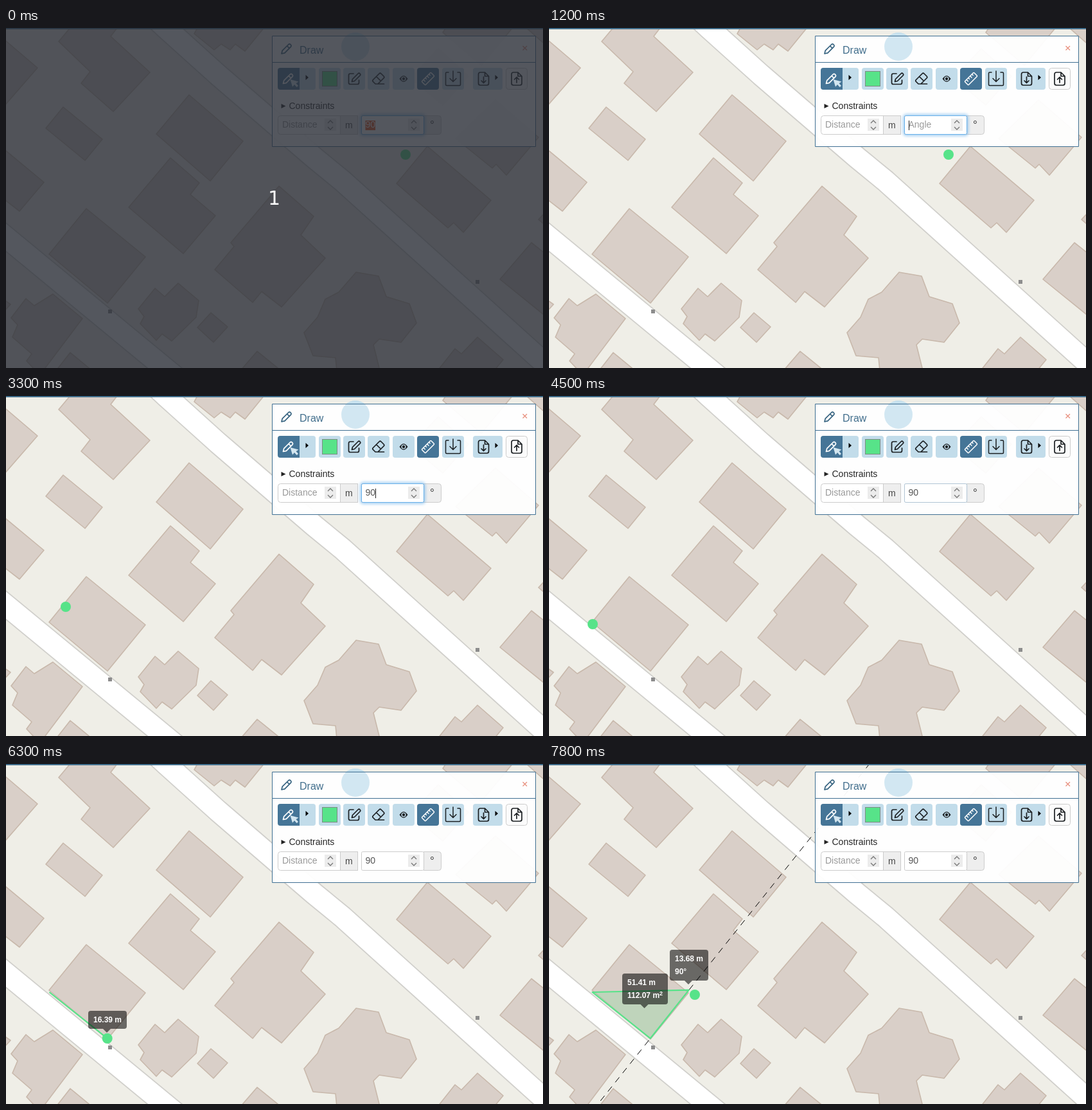
An HTML page for the animation above (8 s loop, 836 px wide and 529 px high).

```html
<!DOCTYPE html>
<html lang="en">
<head>
<meta charset="utf-8">
<title>Draw with constraints</title>
<style>
html, body { margin: 0; width: 100%; height: 100%; overflow: hidden; }
svg { display: block; width: 836px; height: 529px; font-family: "Liberation Sans", Arial, sans-serif; font-size: 14px; }
.bld path { fill: #d9cfc8; stroke: #c8b8ab; stroke-width: 1.6; stroke-linejoin: round; }
.road { fill: none; stroke-linejoin: round; }
.case { stroke: #d0cfcb; stroke-width: 36; }
.lane { stroke: #fff; stroke-width: 32.5; }
.btn { fill: #c2dcea; }
.on { fill: #457597; }
.ico { fill: none; stroke: #1b1f22; stroke-width: 1.7; stroke-linejoin: round; stroke-linecap: round; }
.field { fill: #fff; stroke: #ccc; }
.addon { fill: #eee; stroke: #ccc; }
.spin { fill: none; stroke: #777; stroke-width: 1.3; }
.hint { fill: #999; }
.tip text { font-size: 12px; font-weight: bold; fill: #fff; }
.tip .sup { font-size: 9px; }
.tip rect, .tip path { fill: #000; fill-opacity: .56; }
</style>
</head>
<body>
<svg viewBox="0 0 836 529" width="836" height="529">
  <defs>
    <filter id="glow" x="-20%" y="-50%" width="140%" height="200%"><feGaussianBlur stdDeviation="2.2"/></filter>
    <g id="pencil"><path d="M-7.5 7.5L-6.3 2.6L3.4-7Q4.8-8.2 6.2-7L7-6.2Q8.2-4.8 7-3.4L-2.6 6.3ZM1-4.6L4.6-1"/></g>
    <g id="spinner">
      <rect x="-9" y="141" width="18" height="19" fill="#ececec"/>
      <path class="spin" d="M-4 148L0 144L4 148M-4 154L0 158L4 154"/>
    </g>
    <g id="sheet"><path d="M2-10H-5Q-8-10-8-7V7Q-8 10-5 10H5Q8 10 8 7V-4ZM2-10V-4H8"/></g>
  </defs>

  <rect width="836" height="529" fill="#efeee7"/>
  <g class="road case"><path d="M234-14L249 0L330 73L480 202L524 238L850 532"/><path d="M-20 309L270 548"/></g>
  <g class="road lane"><path d="M234-14L249 0L330 73L480 202L524 238L850 532"/><path d="M-20 309L270 548"/></g>
  <g class="bld">
    <path d="M-5 16L49 62L-5 124Z"/>
    <path d="M82 21L103-4H176L163 13L224 69L167 130L117 86L131 68Z"/>
    <path d="M89 123L150 173L123 206L62 156Z"/>
    <path d="M285 104L369 176L318 238L234 165Z"/>
    <path d="M-5 187L59 240L21 285L-5 265Z"/>
    <path d="M256 202L301 241L287 259L326 292L276 351L191 279Z"/>
    <path d="M125 281L217 356L158 428L67 352Z"/>
    <path d="M425 246L479 293L459 322L497 358L429 434L398 410L384 427L325 376L355 340L350 334Z"/>
    <path d="M232 405L247 418L268 397L300 424L296 450L258 487L243 476L234 486L209 460L215 449L206 437Z"/>
    <path d="M319 443L345 465L323 489L298 466Z"/>
    <path d="M31 421L44 432L73 414L119 452L58 533H46L32 518L40 507L10 481L18 462L8 451Z"/>
    <path d="M100 505L134 533H78Z"/>
    <path d="M-4 422L7 430L-4 442Z"/>
    <path d="M391 503L428 533H365Z"/>
    <path d="M545 380L580 386L592 418L628 429L639 459L615 489L581 484L572 493L582 533H515L513 513L478 510L464 474L485 450L497 422L518 411Z"/>
    <path d="M734 481L774 516L760 533H672L699 499L709 507Z"/>
    <path d="M818 334L842 353V450L769 391Z"/>
    <path d="M656 184L755 268L712 318L697 303L688 311L608 242Z"/>
    <path d="M700 172L757 218L763 212L779 229L829 170L762 112Z"/>
    <path d="M842 284L829 298L842 309Z"/>
    <path d="M299-2L293 9L324 34L335 25L349 34L357 25L372 36L403-2Z"/>
    <path d="M686-2L680 7L740 58L790-2Z"/>
    <path d="M808-2L842 28V-2Z"/>
    <path d="M673 32L720 75L680 120L630 78Z"/>
  </g>
  <g fill="#8d8d8d"><rect x="159" y="438" width="6" height="6"/><rect x="731" y="392" width="6" height="6"/></g>

  <g id="sketch">
    <path id="guide" d="M80.2 524L497.2 2" fill="none" stroke="#000" stroke-dasharray="10 8.4"/>
    <path id="shape" fill="#57e389" fill-opacity=".2" stroke="#57e389" stroke-width="2.2" stroke-linejoin="round"/>
    <circle id="dot" r="8" fill="#57e389"/>
    <g id="tipA" class="tip"></g>
    <g id="tipB" class="tip"></g>
  </g>

  <rect width="836" height="2" fill="#426f8d"/>

  <g id="panel">
    <circle cx="544" cy="29" r="22" fill="#bcd9e7"/>
    <rect x="414.5" y="12.5" width="410" height="172" fill="#fff" fill-opacity=".95"/>
    <circle cx="544" cy="29" r="22" fill="#c9e3ef" fill-opacity=".8"/>
    <path d="M414.5 12.5H824.5V184.5H414.5ZM414.5 53.5H824.5" fill="none" stroke="#3f6f92"/>
    <g class="ico" style="stroke:#35627f"><use href="#pencil" x="436.5" y="32.5"/></g>
    <text x="457" y="40" font-size="16" fill="#416e8c">Draw</text>
    <path d="M804.5 28L811 34.5M811 28L804.5 34.5" stroke="#e8907e" stroke-width="1.3"/>

    <path class="btn" d="M457 62H478Q482 62 482 66V92Q482 96 478 96H457Z"/>
    <path class="on" d="M427 62H457V96H427Q423 96 423 92V66Q423 62 427 62Z"/>
    <g id="buttons"></g>
    <path d="M466.500 73L471 77L466.500 81ZM761.500 73L766 77L761.500 81Z" fill="#000"/>
    <g class="ico" style="stroke:#fff"><use href="#pencil" x="439" y="79"/></g>
    <path d="M442.500 80L455.500 83.500L451.500 86L455 90L452.500 92L449 88L446 91.500Z" fill="#d3e6f0"/>
    <rect x="492.500" y="67.500" width="23" height="23" fill="#57e389" stroke="#7d8b83"/>
    <g class="ico">
      <path d="M541 71H536Q533.500 71 533.500 73.500V85Q533.500 87.500 536 87.500H547Q549.500 87.500 549.500 85V81M538.500 83.500L539.500 79.500L548 71Q549.500 69.500 551 71Q552.500 72.500 551 74L542.500 82.500Z"/>
      <path d="M571.500 80.500L581 71Q582.500 69.500 584 71L588 75Q589.500 76.500 588 78L579 87H575L571.500 83.500Q570 82 571.500 80.500ZM576.500 75.500L583.500 82.500M579 87H588.500"/>
      <path d="M689 69H686Q684.500 69 684.500 70.500V88Q684.500 89.500 686 89.500H706Q707.500 89.500 707.500 88V70.500Q707.500 69 706 69H703M696 67V83M691 78.500L696 83.500L701 78.500" stroke-width="1.5"/>
      <use href="#sheet" x="743.500" y="79"/><path d="M743.500 76V85M740 82L743.500 85.500L747 82"/>
      <use href="#sheet" x="795" y="79"/><path d="M795 85V77M791.500 80L795 76.500L798.500 80"/>
    </g>
    <path d="M612.500 79Q619 69.500 625.500 79Q619 88.500 612.500 79Z" fill="#1b1f22"/>
    <circle cx="619" cy="79" r="3.600" fill="#c2dcea"/><circle cx="619" cy="79" r="2.200" fill="#1b1f22"/>
    <g transform="translate(657 79) rotate(-45)" fill="none" stroke="#fff" stroke-width="1.500">
      <rect x="-10" y="-4" width="20" height="8" rx="1"/><path d="M-6-4V0M-2-4V-1M2-4V0M6-4V-1"/>
    </g>

    <path d="M428.500 118L435.500 121.500L428.500 125Z" fill="#222"/>
    <text x="440.500" y="126" fill="#262626">Constraints</text>

    <path class="field" d="M520.500 136.500H427.500Q423.500 136.500 423.500 140.500V161.500Q423.500 165.500 427.500 165.500H520.500Z"/>
    <text class="hint" x="430" y="155">Distance</text>
    <use href="#spinner" x="505"/>
    <rect class="addon" x="520.500" y="136.500" width="27" height="29"/>
    <text x="528" y="156" fill="#444">m</text>
    <path class="addon" d="M650.500 136.500H673.500Q677.500 136.500 677.500 140.500V161.500Q677.500 165.500 673.500 165.500H650.500Z"/>
    <text x="660" y="156" font-size="17" fill="#333">°</text>
    <rect id="ring" x="553.500" y="136.500" width="97" height="29" rx="3" fill="none" stroke="#66afe9" stroke-width="5" filter="url(#glow)"/>
    <rect class="field" x="553.500" y="136.500" width="97" height="29" rx="2"/>
    <rect id="edge" x="553.500" y="136.500" width="97" height="29" rx="2" fill="none" stroke="#66afe9"/>
    <use href="#spinner" x="635"/>
    <rect id="mark" x="559.500" y="144" width="15.500" height="15" fill="#e95420"/>
    <text id="angle" x="559.500" y="155"></text>
    <rect id="caret" y="144" width="1" height="15" fill="#222"/>
  </g>

  <g id="veil">
    <rect width="836" height="529" fill="#2a2d36" fill-opacity=".8"/>
    <text x="417.500" y="275" text-anchor="middle" font-size="30" fill="#fff" style="font-family:'DejaVu Sans',sans-serif">1</text>
  </g>
</svg>
<script>
const $ = id => document.getElementById(id);
const show = (el, on) => { el.style.display = on ? '' : 'none'; };
const LOOP = 8000, STEP = 100, SCALE = 0.142;
const A = [67.5, 355], B = [157.7, 426.97];

// toolbar buttons: x, width, class
$('buttons').innerHTML = [
  [487, 34, 'btn'], [525, 34, 'btn'], [563, 34, 'btn'], [602, 34, 'btn'],
  [640, 34, 'on'], [679, 34, 'btn'], [727, 46, 'btn'], [778, 34, 'addon']
].map(([x, w, c]) => c === 'addon'
  ? `<rect x="${x + .5}" y="62.5" width="${w - 1}" height="33" rx="4" fill="#fbfbfb" stroke="#ccc"/>`
  : `<rect class="${c}" x="${x}" y="62" width="${w}" height="34" rx="4"/>`).join('');

// pointer path: time, x, y
const path = [
  [2700, 622, 197], [2800, 592, 203], [2900, 480, 232], [3000, 325, 273],
  [3100, 195, 306], [3200, 115, 324], [3300, 93, 328], [3400, 93, 328],
  [3800, 78, 345], [4200, 68, 355], [4500, 68, 355], [4700, 78, 363],
  [5000, 128, 402], [5200, 147, 416.5], [5300, 152.9, 419.7], [5400, 157, 426],
  [5500, 157, 426], [5600, 157, 428], [6200, 157, 428], [6300, 157.7, 426.97],
  [7300, 157.7, 426.97], [7400, 164, 421], [7600, 201, 384], [7800, 227, 359.03]
];

function pointer(t) {
  const i = path.findIndex(k => k[0] >= t);
  if (i < 0) return path[path.length - 1].slice(1);
  if (i === 0) return path[0].slice(1);
  const [t0, x0, y0] = path[i - 1], [t1, x1, y1] = path[i];
  const k = (t - t0) / (t1 - t0);
  return [x0 + (x1 - x0) * k, y0 + (y1 - y0) * k];
}

const dist = (p, q) => Math.hypot(q[0] - p[0], q[1] - p[1]) * SCALE;
const num = v => String(+v.toFixed(2));

function tip(el, [x, y], lines) {
  show(el, !!lines);
  if (!lines) return;
  const h = 8 + 20 * lines.length, bottom = Math.round(y - 15), top = bottom - h;
  el.innerHTML = '<rect rx="4"/><path/>' + lines.map((s, i) =>
    `<text y="${top + 18 + 20 * i}">${s.replace('²', '<tspan class="sup" dy="-4">2</tspan>')}</text>`).join('');
  const texts = [...el.querySelectorAll('text')];
  const w = Math.round(Math.max(...texts.map(n => n.getComputedTextLength())) + 16);
  const left = Math.round(x - w / 2), mid = left + w / 2 - 1;
  texts.forEach(n => n.setAttribute('x', left + 8));
  const box = el.firstChild;
  Object.entries({ x: left, y: top, width: w, height: h }).forEach(([k, v]) => box.setAttribute(k, v));
  el.children[1].setAttribute('d', `M${mid - 6} ${bottom}h12l-6 6Z`);
}

// foot of the pointer on the line through B at a right angle to AB
function project(p) {
  const dx = B[0] - A[0], dy = B[1] - A[1], len = Math.hypot(dx, dy);
  const u = [dy / len, -dx / len];
  const d = (p[0] - B[0]) * u[0] + (p[1] - B[1]) * u[1];
  return [B[0] + u[0] * d, B[1] + u[1] * d];
}

// label anchor: middle of the shape's chord at half its height
function inner(c) {
  const y = (Math.min(A[1], c[1]) + B[1]) / 2, k = (B[1] - y);
  const xl = B[0] + (A[0] - B[0]) * k / (B[1] - A[1]);
  const xr = c[1] < B[1] - 40 ? B[0] + (c[0] - B[0]) * k / (B[1] - c[1]) : null;
  if (xr !== null) return [(xl + xr) / 2, y];
  // flat triangle: chord ends on the side from A to C
  const xs = A[0] + (c[0] - A[0]) * (y - A[1]) / (c[1] - A[1]);
  return [(xl + xs) / 2, y];
}

function sketch(t) {
  const p = pointer(t), dot = $('dot'), shape = $('shape');
  dot.setAttribute('cx', p[0]);
  dot.setAttribute('cy', p[1]);
  const line = t > 4500, area = t >= 7000;
  show($('guide'), area);
  show(shape, line);
  if (!area) {
    shape.setAttribute('d', `M${A}L${p}`);
    tip($('tipA'), p, line && [num(dist(A, p)) + ' m']);
    tip($('tipB'), p, null);
    return;
  }
  const c = project(p), ab = dist(A, B), bc = dist(B, c);
  shape.setAttribute('d', `M${A}L${B}L${c}Z`);
  tip($('tipA'), inner(c), [num(ab + bc + dist(c, A)) + ' m', num(ab * bc / 2) + ' m²']);
  tip($('tipB'), c, [num(bc) + ' m', (bc > .01 ? 90 : 0) + '°']);
}

function field(t) {
  const picked = t < 1200, empty = t >= 1200 && t < 2100;
  const text = empty ? 'Angle' : t >= 2100 && t < 2200 ? '9' : '90';
  $('angle').textContent = text;
  $('angle').setAttribute('fill', picked ? '#fff' : empty ? '#999' : '#555');
  show($('mark'), picked);
  const blink = t >= 1200 && t < 1700 || t >= 2100 && t < 2800 ||
    t >= 3200 && t < 3700 || t >= 4200 && t < 4400;
  show($('caret'), blink);
  $('caret').setAttribute('x', empty ? 560 : text === '9' ? 567 : 575);
  const focus = t < 4400 ? 1 : t < 4500 ? .6 : t < 4600 ? .25 : 0;
  $('ring').style.opacity = focus === .25 ? .04 : focus * .6;
  $('edge').style.opacity = focus;
}

function draw() {
  const t = Math.floor((performance.now() - start) % LOOP / STEP) * STEP;
  show($('veil'), t < 100);
  field(t);
  sketch(t);
  requestAnimationFrame(draw);
}

const start = performance.now();
draw();
</script>
</body>
</html>
```
